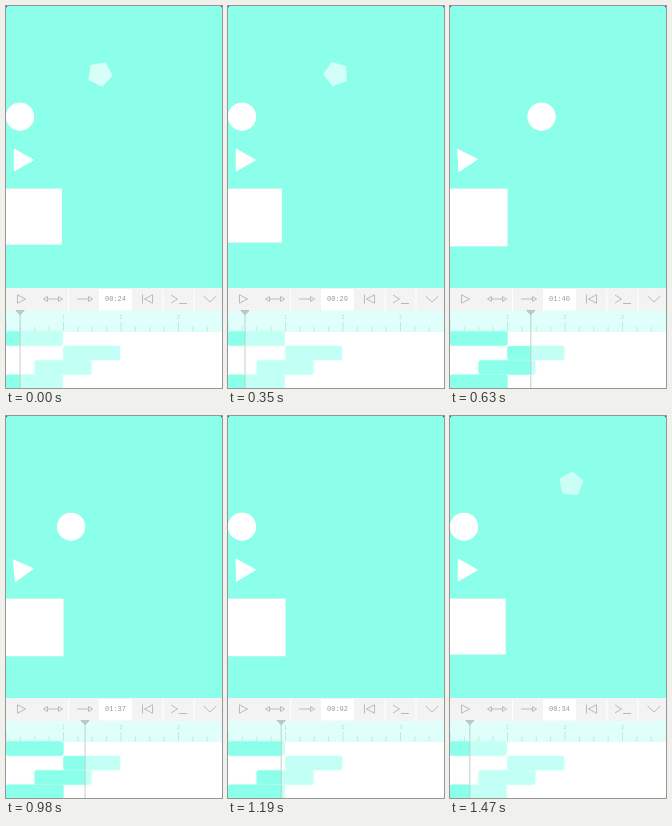
Write an HTML page that moves like this. It is 216 px wide and 382 px high and loops after 1540 ms.

```html
<!DOCTYPE html>
<html lang="en">
<head>
<meta charset="utf-8">
<title>Timeline scrubbing</title>
<style>
  html, body { margin: 0; width: 100%; height: 100%; overflow: hidden; background: #8cffeb; }
  svg { display: block; width: 100%; height: 100%; }
  .icons { fill: none; stroke: #b4b4b4; stroke-width: .9; }
  .shape { fill: #fff; filter: drop-shadow(0 0 .7px rgba(255, 255, 255, .75)); }
  .card { fill: #fff; filter: drop-shadow(0 .9px .3px #dce4e2); }
  .clock { font: 7px "Liberation Mono", monospace; fill: #999; text-anchor: middle; }
  .label { font: 5px "Liberation Sans", sans-serif; fill: #98e3d6; text-anchor: middle; }
  .tick { stroke: #aeeee3; stroke-width: .9; }
  .rest { fill: #c2fff5; filter: drop-shadow(0 0 .8px rgba(180, 255, 243, .8)); }
  .done { fill: #8cffeb; filter: drop-shadow(0 0 .5px rgba(140, 255, 235, .8)); }
</style>
</head>
<body>
<svg viewBox="0 0 216 382" preserveAspectRatio="none">
  <rect width="216" height="382" fill="#8cffeb"/>
  <path d="M0 0H2Q0 0 0 2ZM216 0H214Q216 0 216 2Z" fill="#123"/>

  <polygon id="pentagon" fill="#fff"/>
  <circle id="circle" class="shape" cy="110.7" r="14"/>
  <g class="shape"><polygon id="triangle"/></g>
  <rect id="square" class="card" x="-1" y="182.7"/>

  <rect y="282" width="216" height="23" fill="#f3f3f3"/>
  <rect x="93" y="283" width="33" height="21.5" fill="#fff"/>
  <path d="M62.5 283V304.5M157 283V304.5M188 283V304.5" stroke="#fff"/>
  <path class="icons" d="M11.5 288.8L19.5 293L11.5 297.2Z
    M41 293H53M41.5 290.6L37.5 293L41.5 295.4ZM52.5 290.6L56.5 293L52.5 295.4Z
    M71 293H83M82.5 290.6L86.5 293L82.5 295.4Z
    M136.5 288.5V297.5M146.5 288.8L138.5 293L146.5 297.2Z
    M165 289L171.5 293L165 297M173 297.5H181
    M197.5 290L204 296L210.5 290"/>
  <text id="clock" class="clock" x="109.5" y="295.3"></text>

  <rect y="305" width="216" height="20.5" fill="#e0fffa"/>
  <g id="ruler"></g>
  <rect y="325.5" width="216" height="56.5" fill="#fff"/>
  <g id="tracks"></g>
  <g id="playhead">
    <path d="M0 308V382" stroke="#b9cbc7" stroke-width=".9"/>
    <path d="M-4.2 304.5H4.2L0 308.7Z" fill="#b9cdc8" stroke="#a5b2af" stroke-width=".6"/>
  </g>
</svg>
<script>
const SECOND = 57.5; // timeline pixels per second
const STEP = 70;
// Scrubbed position in centiseconds, one entry per step.
const SCRUB = [24, 20, 18, 18, 22, 29, 50, 64, 93, 140, 140, 140, 140,
  139, 137, 133, 127, 92, 44, 40, 35, 34];

const $ = id => document.getElementById(id);
const clamp = p => Math.min(1, Math.max(0, p));
const quadOut = p => 1 - (1 - p) ** 2;
const expoInOut = p => p === 0 ? 0 :
  p < .5 ? 2 ** (20 * p - 11) : 1 - 2 ** (9 - 20 * p);
const elasticOut = p => p === 0 ? 0 : p === 1 ? 1 :
  1 + 2 ** (-10 * p) * Math.sin((p - .075) * 2 * Math.PI / .3);

function add(parent, name, attrs, text = "") {
  const node = document.createElementNS("http://www.w3.org/2000/svg", name);
  set(node, attrs);
  node.textContent = text;
  return parent.appendChild(node);
}

function set(node, attrs) {
  for (const key in attrs) node.setAttribute(key, attrs[key]);
}

function polygon(sides, radius) {
  return Array.from({ length: sides }, (_, i) => {
    const a = i * 2 * Math.PI / sides;
    return `${(radius * Math.cos(a)).toFixed(2)},${(radius * Math.sin(a)).toFixed(2)}`;
  }).join(" ");
}

set($("pentagon"), { points: polygon(5, 12.9) });
set($("triangle"), { points: polygon(3, 13.4) });

for (let i = 0; i < 15; i++) {
  const x = i * SECOND / 4;
  const major = i % 4 === 0;
  add($("ruler"), "line", { class: "tick", x1: x, x2: x, y1: major ? 316 : 320.5, y2: 325.5 });
  if (major && i) add($("ruler"), "text", { class: "label", x, y: 313 }, i / 4);
}

const tracks = [0, 1, .5, 0].map((start, row) => {
  const box = { x: start * SECOND, y: 325.6 + row * 14.4, height: 14, rx: 2 };
  add($("tracks"), "rect", { ...box, class: "rest", width: SECOND - 1 });
  return { start, bar: add($("tracks"), "rect", { ...box, class: "done" }) };
});

function draw(now) {
  const cs = SCRUB[Math.floor(now / STEP) % SCRUB.length];
  const t = cs / 100;
  const first = clamp(t);

  const slide = quadOut(first);
  set($("pentagon"), {
    transform: `translate(${13 + 191.5 * slide} 68) rotate(${360 * slide})`,
    opacity: t < .47 ? .9 - 1.02 * t : 0
  });
  set($("circle"), { cx: 14 + 620 * expoInOut(clamp(t - 1)) });
  set($("triangle"), {
    transform: `translate(14.6 154) rotate(${360 * quadOut(clamp(t - .5))})`
  });
  const size = 29 + 28.5 * elasticOut(first);
  set($("square"), { width: size + 1, height: size });

  for (const { start, bar } of tracks)
    set(bar, { width: clamp(t - start) * SECOND });
  set($("playhead"), { transform: `translate(${t * SECOND + .3} 0)` });

  const pad = n => String(n).padStart(2, "0");
  $("clock").textContent = `${pad(Math.floor(cs / 100))}:${pad(cs % 100)}`;
}

const began = performance.now();
(function tick() {
  draw(performance.now() - began);
  requestAnimationFrame(tick);
})();
</script>
</body>
</html>
```
